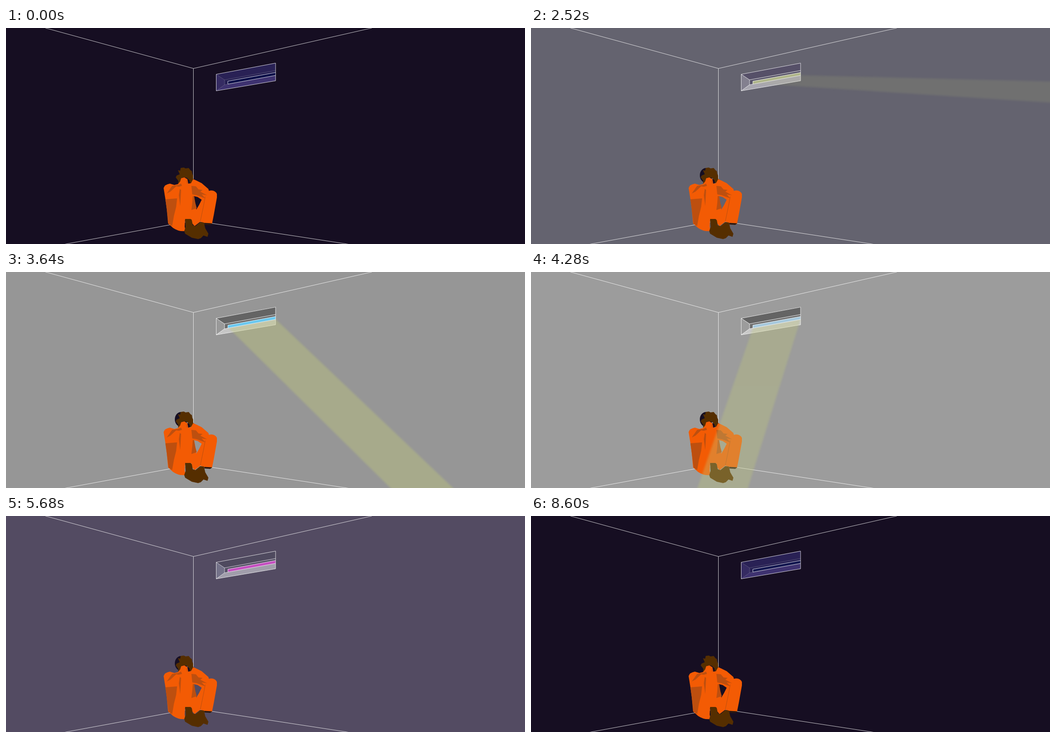
These frames come from a looping animation (1159x483 px, 8.64 s). An HTML page:

```html
<!DOCTYPE html>
<html lang="en">
<head>
<meta charset="utf-8">
<title>Cell window</title>
<style>
  html, body { margin: 0; width: 100%; height: 100%; overflow: hidden; background: #160e22; }
  svg { display: block; width: 1159px; height: 483px; }
  .line { fill: none; stroke: #fff; }
  .cloth { fill: #f35b04; fill-rule: evenodd; }
  .fold { fill: #bd4f0f; }
  .skin { fill: #552e00; }
</style>
</head>
<body>
<svg viewBox="0 0 1159 483">
  <defs>
    <filter id="soft" filterUnits="userSpaceOnUse" x="-50" y="0" width="1300" height="600">
      <feGaussianBlur stdDeviation="2.2"/>
    </filter>
    <clipPath id="inside">
      <path d="M0 217L496 126L602 106V98L1159 60V483H0Z"/>
    </clipPath>
  </defs>
  <rect id="wall" width="1159" height="483"/>
  <path class="line" stroke-opacity=".78" d="M88 0L418.5 90.5L817 0M418.5 90.5V430.5M131 483.5L418.5 430.5L765 483.5"/>

  <g id="window">
    <path id="top" d="M469.5 103.5L602 78V95L488 116Z"/>
    <path id="side" d="M469.5 103.5L488 116V127L469.5 140.5Z"/>
    <path id="sill" d="M469.5 140.5L488 127L602 106V118Z"/>
    <path id="frame" d="M488 116L602 95V99.5L495.5 119V125.5L488 127Z"/>
    <path id="glass" d="M495.5 119L602 99.5V106L495.5 125.5Z"/>
    <path id="depth" class="line" d="M469.5 103.5L488 116V127L469.5 140.5M488 116L602 95M488 127L496 125.5"/>
    <path class="line" stroke-opacity=".8" d="M469.5 103.5L602 78.5V118L469.5 140.5ZM602 99.5L495.5 119V125.5L602 106"/>
  </g>

  <g id="person">
    <ellipse cx="391" cy="329.5" rx="14" ry="16.5" fill="#160e22"/>
    <path fill="#160e22" d="M384 340L408 338L414 345L406 349L388 349Z"/>
    <path class="skin" d="M384 348L385 342L379 334L381 330L388 327L384 318L389 319L390 313L397 312L401 314L408 313L412 318L415 320L416 326L418 330L418 337L421 340L416 345L411 347L410 341L404 335L396 334L390 337L390 345Z"/>
    <path class="cloth" d="M352 358Q354 350 366 348L376 351L384 349L389 343L391 336L398 334L405 338L407 348L413 347L418 338L425 341L437 347L452 360L453 364Q466 361 471 371L471 379L464 418L460 438L443 436L434 433L421 443L416 437L414 428L400 427L399 444L401 454Q386 456 373 447L362 437L359 405L356 383Z
      M420 376L428 378L437 384L431 396L425 406L422 390Z"/>
    <path class="fold" d="M356 383L382 381L380 400L375 420L371 443L363 437L359 405Z"/>
    <path class="fold" d="M359 370L371 353L384 351L391 348L393 353L386 355L380 354L367 366Z"/>
    <path class="fold" d="M414 353L424 354L430 361L439 362L434 366L449 374L437 372L445 381L426 374L416 372Z"/>
    <path class="fold" d="M417 376L420 376L423 392L426 403L414 407L416 391ZM388 360L391 362L389 398L386 374Z"/>
    <path fill="none" stroke="#bd4f0f" d="M445 377L440 403L434 432M403 341L405 348"/>
    <path class="skin" d="M400 427L412 427L415 430L417 441L423 443L434 434L442 435L445 448L452 460L450 467L441 464L435 470L429 472L415 469L400 460L398 454L401 445Z"/>
    <path d="M443 436L460 437L456 440L443 439Z" fill="#1c1019" stroke="#552e00" stroke-width=".7"/>
  </g>

  <g clip-path="url(#inside)">
    <path id="beam" fill="#c0c87b" filter="url(#soft)"/>
  </g>
</svg>
<script>
const LOOP = 8640, STEP = 40;
const byId = id => document.getElementById(id);

// Rows of [time, value]; a value is a colour or a list of numbers.
const colours = {
  wall: [[0, "160e22"], [2520, "64636f"], [3640, "969696"], [3800, "9c9c9c"], [4280, "9c9c9c"],
         [5680, "534b62"], [6880, "2f2e3c"], [7940, "160e22"]],
  top: [[0, "292155"], [2520, "565068"], [3640, "646464"], [4280, "646464"],
        [5680, "4f4a5f"], [6880, "38335c"], [7940, "292155"]],
  side: [[0, "352b62"], [2520, "83808f"], [3640, "999999"], [4280, "9c9c9c"],
         [5680, "747289"], [6880, "4f4773"], [7940, "352b62"]],
  sill: [[0, "3e3270"], [2520, "a8a6b0"], [3640, "c6c6c6"], [4280, "c8c8c8"],
         [5680, "a19eab"], [6880, "69638b"], [7940, "3e3270"]],
  frame: [[0, "262054"], [2520, "5a566a"], [3640, "6c6c6c"], [4280, "707070"],
          [5680, "565166"], [6880, "343056"], [7940, "262054"]],
  glass: [[0, "080c48"], [2520, "afb58a"], [3640, "6ac8ef"], [4280, "a6c8dc"],
          [5680, "c44fc0"], [6880, "6e2a96"], [8600, "121650"], [8640, "080c48"]]
};
const depthLine = [[0, [.22]], [2520, [.8]], [4280, [.85]], [5680, [.7]], [6880, [.4]], [7940, [.22]]];

// Left edge angle, right edge angle, strength.
const light = [[2000, [0, -2, 0]], [2520, [3.7, 1.45, .13]], [3080, [17, 15.5, .27]],
  [3640, [44.7, 43.6, .41]], [3960, [74, 72.6, .38]], [4280, [109.1, 107.3, .34]],
  [4720, [140, 139, 0]]];

const rgb = hex => [0, 2, 4].map(i => parseInt(hex.slice(i, i + 2), 16));
for (const rows of Object.values(colours)) rows.forEach(row => row[1] = rgb(row[1]));

function at(rows, t) {
  const i = rows.findIndex(row => row[0] > t);
  if (i < 0) return rows[rows.length - 1][1];
  if (i === 0) return rows[0][1];
  const [t0, a] = rows[i - 1], [t1, b] = rows[i];
  return a.map((v, k) => v + (b[k] - v) * (t - t0) / (t1 - t0));
}

function ray(x, y, degrees) {
  const a = degrees * Math.PI / 180;
  return `${x + 1300 * Math.cos(a)} ${y + 1300 * Math.sin(a)}`;
}

function draw(t) {
  for (const id in colours) byId(id).setAttribute("fill", `rgb(${at(colours[id], t).map(Math.round)})`);
  byId("depth").setAttribute("stroke-opacity", at(depthLine, t)[0]);
  const [left, right, strength] = at(light, t);
  const beam = byId("beam");
  beam.setAttribute("d", `M496 124L602 105.5L${ray(602, 105.5, right)}L${ray(496, 124, left)}Z`);
  beam.setAttribute("opacity", strength);
}

const start = performance.now();
function tick() {
  const t = (performance.now() - start) % LOOP;
  draw(Math.floor(t / STEP) * STEP);
  requestAnimationFrame(tick);
}
tick();
</script>
</body>
</html>
```
